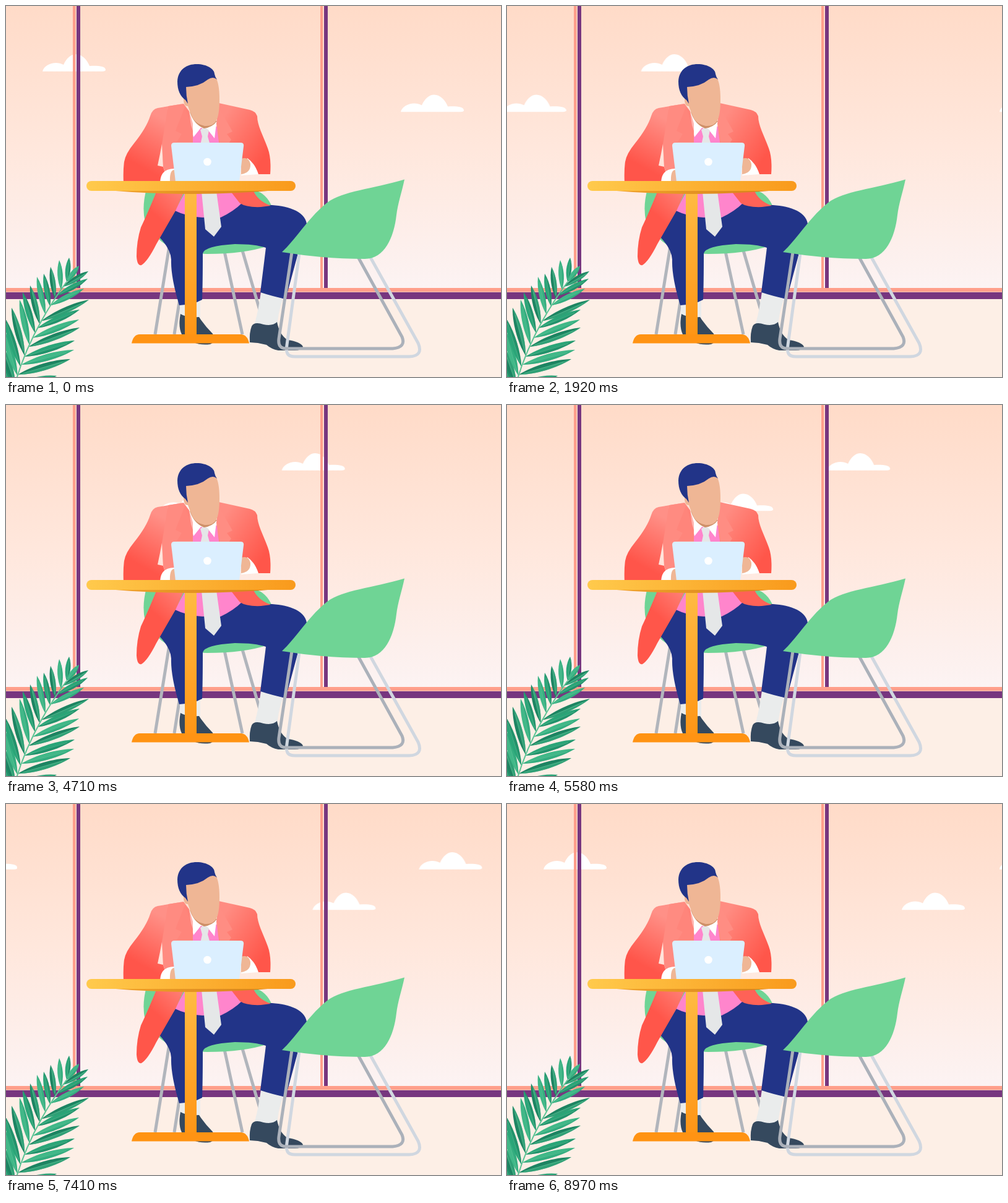
An HTML page for the animation above (9 s loop, 800 by 600 pixels).

```html
<!DOCTYPE html>
<html lang="en">
<head>
<meta charset="utf-8">
<title>Working by the window</title>
<style>
  html, body { margin: 0; width: 100%; height: 100%; overflow: hidden; background: #fdefe6; }
  svg { display: block; width: 800px; height: 600px; }
  /* One step every 30 ms, then a single held step before the loop */
  .leaving, .arriving { animation: 9s infinite; }
  .leaving { animation-name: leave; }
  .arriving { animation-name: arrive; }
  @keyframes leave {
    0% { transform: translateX(0); animation-timing-function: steps(299, end); }
    99.6667%, 100% { transform: translateX(736.5px); }
  }
  @keyframes arrive {
    0% { transform: translateX(-820px); animation-timing-function: steps(299, end); }
    99.6667%, 100% { transform: translateX(0); }
  }
</style>
</head>
<body>
<svg viewBox="0 0 800 600" xmlns="http://www.w3.org/2000/svg">
  <defs>
    <linearGradient id="sky" x2="0" y2="1">
      <stop stop-color="#ffdbc8"/><stop offset=".5" stop-color="#ffe7dc"/><stop offset="1" stop-color="#fcf3f3"/>
    </linearGradient>
    <linearGradient id="top"><stop stop-color="#ffca4c"/><stop offset="1" stop-color="#f99a1c"/></linearGradient>
    <linearGradient id="edge"><stop stop-color="#f3a52c"/><stop offset="1" stop-color="#d5801a"/></linearGradient>
    <linearGradient id="stem" x2="0" y2="1"><stop stop-color="#ffbb43"/><stop offset="1" stop-color="#ff9515"/></linearGradient>
    <linearGradient id="arm" gradientUnits="userSpaceOnUse" x1="254" y1="182" x2="213" y2="257">
      <stop stop-color="#ff9087"/><stop offset="1" stop-color="#ff554a"/>
    </linearGradient>
    <linearGradient id="armRight" gradientUnits="userSpaceOnUse" x1="345" y1="190" x2="420" y2="240">
      <stop stop-color="#ff8c82"/><stop offset="1" stop-color="#ff564a"/>
    </linearGradient>
    <linearGradient id="tail" gradientUnits="userSpaceOnUse" x1="283" y1="297" x2="243" y2="340">
      <stop stop-color="#ff8177"/><stop offset="1" stop-color="#ff564a"/>
    </linearGradient>
    <g id="clouds" fill="#fff">
      <path id="cloud" d="M59 105.700C62 94 80 88 93 95C98 84 105 78 113 78C123 78 131 87 135 97C149 96.500 160 97 161 103Q161 105.700 156 105.700Z"/>
      <use href="#cloud" x="579" y="65.5"/>
    </g>
  </defs>

  <rect width="800" height="457" fill="url(#sky)"/>
  <use href="#clouds" class="leaving"/>
  <use href="#clouds" class="arriving"/>

  <!-- Window frame and floor -->
  <rect y="456" width="800" height="144" fill="#fdefe6"/>
  <path fill="#ff9f8b" d="M108 0h4.500v457h-4.500zM508 0h4v457h-4zM0 456h800v6.500H0z"/>
  <path fill="#77367f" d="M114 0h6v456h-6zM514 0h6v456h-6zM0 463h800v11H0z"/>

  <g id="plant"></g>

  <!-- Rear chair -->
  <path fill="none" stroke="#b1b5bc" stroke-width="5" d="M264 388L241 531M286 440L272 531M353 397L382 531M381 392L411 495"/>
  <path fill="#6fd495" d="M227 296Q219 325 225 350L248 378Q270 399 325 401Q385 401 424 388L430 325Q421 303 402 298Z"/>

  <!-- Legs and shoes -->
  <path fill="#eaecec" d="M281 478H314V507L300 516L281 505ZM412 462L448 473Q439 496 438 522L401 517Q408 493 412 462Z"/>
  <g fill="#35495e">
    <path d="M282 498Q293 505 312 503Q321 517 334 530Q341 543 330 547Q315 549 303 544L284 531Q278 518 282 498Z"/>
    <path d="M397 518Q401 510 416 515Q431 518 438 511Q442 532 455 540Q476 543 480 551Q478 557 466 557H440Q429 555 421 548L407 545L394 544Q393 528 397 518Z"/>
  </g>
  <path fill="#223488" d="M274 330L248 374Q266 393 267 410Q266 438 280 484Q303 483 317 475Q318 448 318 400Q321 388 370 385Q403 385 420 391Q415 432 411 463Q429 469 452 474L472 400L486 352C483 331 452 322 425 322H400L370 312Z"/>

  <!-- Shirt, collar and tie -->
  <path fill="#ff85cc" d="M301 185L288 304L273 331Q291 340 317 342H347Q368 332 381 319L365 290L341 195Z"/>
  <path fill="#fff" d="M297 174Q299 196 303 212L315 197L326 200L337 214L341 182Z"/>
  <path fill="#e5e7e8" d="M314 200L321 196L328 201L326 211L330 225H314L317 211ZM316 300H340L348 357L336 373L322 361Z"/>

  <!-- Coat -->
  <path fill="url(#arm)" d="M287 158L245 165Q236 167 233 178Q227 197 207 222Q193 239 191 252Q189 266 190 287H262L254 260L262 163Z"/>
  <path fill="#ff8b81" d="M287 158L262 162L252 223L254 260L262 287H302V221L296 170Z"/>
  <path fill="#ff9187" d="M289 163L274 202L284 207L276 220L278 236L302 228V202Z"/>
  <path fill="#ff7c71" d="M276 220H302V190Q298 175 295 170L289 163L274 202L284 207Z" opacity=".55"/>
  <path fill="url(#armRight)" d="M344 157L394 168Q403 170 406 178C406 193 415 208 423 230Q429 246 427 272L407 272L383 264L345 227L340 190Z"/>
  <path fill="#ff8d83" d="M345 166L366 203L357 207L364 216L360 222H345L341 190Z"/>
  <path fill="#fff2e9" d="M252 223Q249 240 245 258L254 260Z" opacity=".9"/>
  <path fill="url(#tail)" d="M244 298Q229 335 218 358Q211 380 211 405Q212 421 219 419Q229 413 243 385L274 331L289 298Z"/>
  <path fill="#ff6257" d="M360 296L378 319Q389 326 412 325L428 323Q406 315 399 297Z"/>

  <!-- Cuffs and hands -->
  <path fill="#fff" d="M249 285Q250 263 272 263V285ZM390 246Q402 254 408 272L380 274Z"/>
  <path fill="#efb695" d="M273 265Q264 264 265 285H275ZM380 247Q392 243 395 255Q396 270 380 272Z"/>

  <!-- Head -->
  <path fill="#cf9068" d="M297 171Q303 191 320 198Q334 196 341 186Z"/>
  <path fill="#efb695" d="M288 125L338 114Q345 124 345 151Q345 176 340 185Q335 195 321 194Q308 191 302 182Q296 168 294 162Q287 162 287 152Z"/>
  <path fill="#223488" d="M294 158L290 152Q277 143 277 122C278 102 293 94 308 94C325 94 337 102 337 110Q338 115 341 119Q335 113 326 119Q313 130 291 131Q291 145 294 158Z"/>

  <!-- Laptop -->
  <path fill="#dbefff" d="M267 226Q267 221 272 221H379Q385 221 384 227L377 284H274Z"/>
  <circle cx="325.500" cy="252" r="6.300" fill="#fff"/>

  <!-- Table -->
  <rect x="289" y="301" width="19" height="234" fill="url(#stem)"/>
  <path fill="#ff9313" d="M203 545.500Q206 531 216 531H379Q390 531 393 545.500Z"/>
  <path fill="url(#edge)" d="M155 297Q220 303.500 299 304Q380 303.500 445 297Z"/>
  <rect x="130" y="283" width="338" height="16" rx="8" fill="url(#top)"/>

  <!-- Front chair -->
  <g fill="none" stroke-width="5">
    <path stroke="#d0d7e0" d="M474 400L454 548C452 562 455 567 467 567H652Q675 566 666 545L587 403"/>
    <path stroke="#abb1ba" d="M462 398L441 538Q439 554 453 554H625Q647 552 640 535L569 406"/>
  </g>
  <path fill="#6fd495" d="M446 398C469 377 487 344 519 318C545 299 592 296 644 280.500C640 300 633 320 631 338C627 374 612 409 580 409Q515 409 446 398Z"/>
</svg>

<script>
  const plant = document.getElementById('plant');
  const greens = ['#2ba578', '#1d8462', '#41b888'];

  // Tip of each leaf and where it leaves the stem (0 root, 1 end)
  const left = [
    [-8, 578, -.1], [-8, 548, -.03], [-6, 520, .05], [-4, 501, .14], [9, 488, .25],
    [22, 475, .36], [27, 463, .48], [39, 452, .57], [50, 438, .67], [61, 433, .75],
    [72, 422, .83], [86, 411, .92], [102, 407, 1]
  ];
  const right = [
    [82, 598, -.05], [104, 571, .06], [110, 556, .16], [111, 541, .24], [119, 520, .34],
    [118, 507, .43], [119, 491, .53], [134, 475, .6], [126, 457, .76], [132, 441, .86],
    [133, 429, .95], [118, 420, 1]
  ];

  const bend = (a, b, c, t) => (1 - t) ** 2 * a + 2 * t * (1 - t) * b + t * t * c;
  const draw = (d, style) => {
    const path = document.createElementNS('http://www.w3.org/2000/svg', 'path');
    path.setAttribute('d', d);
    for (const key in style) path.setAttribute(key, style[key]);
    plant.append(path);
  };

  function leaf([x, y, t], i) {
    const bx = bend(16, 40, 98, t), by = bend(606, 525, 446, t);
    const dx = x - bx, dy = y - by, len = Math.hypot(dx, dy);
    const w = 7.5 - 2 * t;
    const at = (f, s) => `${(bx + dx * f - dy / len * s).toFixed(1)} ${(by + dy * f + dx / len * s).toFixed(1)}`;
    const half = s => `M${at(0, 0)}C${at(.3, s)} ${at(.7, s)} ${at(1, 0)}`;
    draw(`${half(w)}C${at(.7, -w)} ${at(.3, -w)} ${at(0, 0)}Z`, { fill: greens[i % 3] });
    draw(`${half(w)}Z`, { fill: greens[(i + 1) % 3], opacity: .55 });
    draw(`M${at(.1, 0)}L${at(.85, 1)}`, { stroke: '#76cfa5', 'stroke-width': .8, opacity: .6 });
  }

  left.forEach(leaf);
  right.forEach(leaf);
  draw('M16 606Q40 525 98 446', { fill: 'none', stroke: '#5cc495', 'stroke-width': 2 });
</script>
</body>
</html>
```
